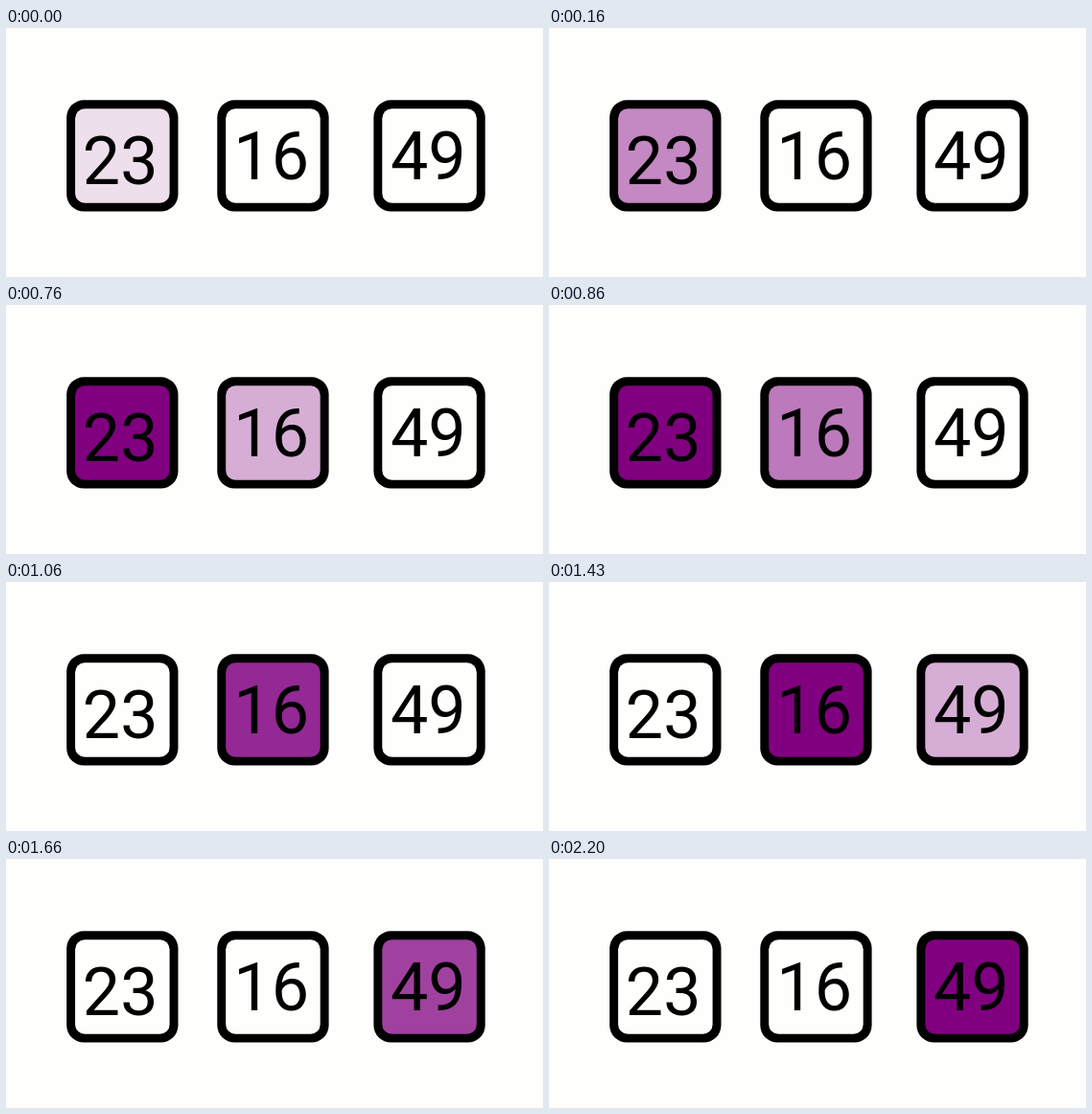
An HTML page with a canvas for the animation above (3560 ms loop, 560 by 260 pixels).

```html
<!DOCTYPE html>
<html lang="en">
<head>
<meta charset="utf-8">
<title>Number boxes</title>
<style>
  html, body { margin: 0; width: 100%; height: 100%; overflow: hidden; background: #fefefc; }
  canvas { display: block; }
</style>
</head>
<body>
<canvas id="stage" width="560" height="260"></canvas>
<script>
const ctx = document.getElementById('stage').getContext('2d');
const LOOP = 3560;
const FADE = 700;
const SIZE = 116.3;
const BORDER = 8.9;
const TOP = 75.3;
const PAPER = [254, 254, 252];
const PURPLE = [128, 0, 128];

// start: fade-in begins, end: back to paper
const boxes = [
  { x: 63.2, label: '23', tx: 79.8, ty: 163, start: -54, end: 875 },
  { x: 220.3, label: '16', tx: 237.3, ty: 157.5, start: 616, end: 1545 },
  { x: 383.4, label: '49', tx: 401, ty: 157.5, start: 1286, end: LOOP }
];

const easeOut = u => Math.sin(Math.min(1, Math.max(0, u)) * Math.PI / 2);
const mix = v => `rgb(${PAPER.map((c, i) => Math.round(c + (PURPLE[i] - c) * v))})`;

function fillLevel(box, t) {
  return t < box.end ? easeOut((t - box.start) / FADE) : 0;
}

function roundRect(x, y, size, r, color) {
  ctx.fillStyle = color;
  ctx.beginPath();
  ctx.roundRect(x, y, size, size, r);
  ctx.fill();
}

function drawBox(box, t) {
  roundRect(box.x, TOP, SIZE, 18, '#000');
  roundRect(box.x + BORDER, TOP + BORDER, SIZE - 2 * BORDER, 10, mix(fillLevel(box, t)));
  ctx.fillStyle = '#000';
  ctx.fillText(box.label, box.tx, box.ty);
}

function draw() {
  const t = performance.now() % LOOP;
  ctx.fillStyle = mix(0);
  ctx.fillRect(0, 0, 560, 260);
  ctx.font = '70px Roboto, sans-serif';
  ctx.textBaseline = 'alphabetic';
  boxes.forEach(box => drawBox(box, t));
  requestAnimationFrame(draw);
}

draw();
</script>
</body>
</html>
```
